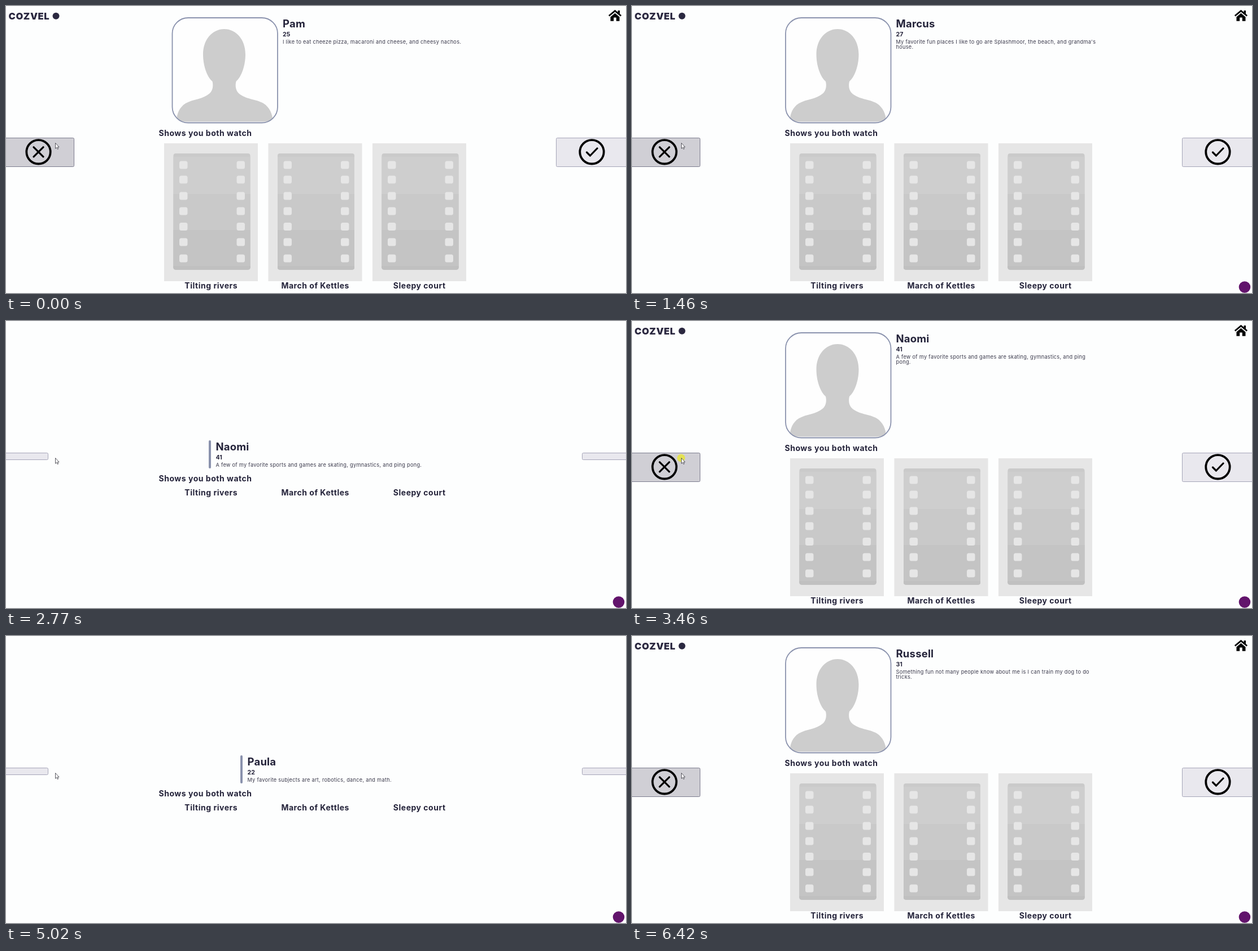
An HTML page for the animation above (7.11 s loop, 1098 by 510 pixels).

```html
<!DOCTYPE html>
<html lang="en">
<head>
<meta charset="utf-8">
<title>Profile matching</title>
<style>
  html, body { margin: 0; width: 100%; height: 100%; overflow: hidden; background: #fdfefe; }
  svg { display: block; }
  text { font-family: Inter, "Open Sans", sans-serif; fill: #24233a; }
  .name { font-size: 18.5px; font-weight: 700; letter-spacing: .2px; }
  .age { font-size: 10.6px; font-weight: 700; }
  .bio { font-size: 9.2px; letter-spacing: .28px; fill: #3b3a4c; }
  .head { font-size: 14px; font-weight: 700; letter-spacing: .52px; }
  .brand { font-size: 16.5px; font-weight: 900; letter-spacing: .6px; fill: #2b2840; }
  .mid { text-anchor: middle; }
  .button { fill: #e9e8ee; stroke: #a5a5b8; }
  .icon { fill: none; stroke: #000; stroke-width: 3.8; stroke-linecap: round; stroke-linejoin: round; }
</style>
</head>
<body>
<svg width="1098" height="510" viewBox="0 0 1098 510">
  <defs>
    <clipPath id="frameClip"><rect x="1" y="21" width="186" height="186" rx="27"/></clipPath>
    <clipPath id="filmClip"><rect x="16.500" y="262" width="136" height="206.500" rx="4"/></clipPath>
  </defs>

  <g id="loaded">
    <text class="brand" x="4.500" y="24">COZVEL</text>
    <circle cx="88.500" cy="17.800" r="6" fill="#2b2840"/>
    <path d="M1067.800 17.500L1078.500 8.600L1089.200 17.500" fill="none" stroke="#000" stroke-width="2.800"/>
    <path d="M1083.500 8h3.500v7h-3.500zM1070.500 19.500L1078.500 12.800L1086.500 19.500V26.700H1080.800V20.500H1076.200V26.700H1070.500Z"/>
    <g id="avatar">
      <rect x="1" y="21" width="186.500" height="186.500" rx="28" fill="#fefefe"/>
      <path clip-path="url(#frameClip)" fill="#cdcdcd" d="M93 41C114.500 41 130.500 60 130.500 86
        C130.500 106 123.500 126 114 134C112 142 113.500 150 118.500 155C130.500 166 148.500 165 162.500 173
        C173.500 180 178.500 192 179.500 205.500H8.500C8.500 192 13.500 180 24.500 173C38.500 165 55.500 166 67.500 155
        C72.500 150 74 142 72 134C62.500 126 55.500 106 55.500 86C55.500 60 71.500 41 93 41Z"/>
      <rect x="1" y="21" width="186.500" height="186.500" rx="28" fill="none" stroke="#8a92ad" stroke-width="1.800"/>
    </g>
    <g id="posters"></g>
    <rect id="reject" class="button" x="-4" y="234.500" width="124.500" height="51" rx="2"/>
    <rect class="button" x="974.500" y="234.500" width="130" height="51" rx="2"/>
    <g class="icon">
      <circle cx="57.500" cy="259.300" r="21.200"/>
      <path stroke-width="3.200" d="M49 250.800l17 17m0 -17l-17 17"/>
      <circle cx="1037.500" cy="259.300" r="21.200"/>
      <path stroke-width="3.200" d="M1028.500 260l6 6l12.500 -13"/>
    </g>
  </g>

  <g id="loading">
    <rect id="bar" y="212" width="4" height="50" rx="2" fill="#8a92ad"/>
    <rect class="button" x="-4" y="234.500" width="78.500" height="12" rx="2"/>
    <rect class="button" x="1020.500" y="234.500" width="90" height="12" rx="2"/>
  </g>

  <g id="profile">
    <text class="name" y="38"></text>
    <text class="age" y="53.500"></text>
    <text class="bio" y="67"></text>
    <text class="bio" y="76"></text>
  </g>
  <text id="heading" class="head" x="270.500">Shows you both watch</text>
  <g id="titles"></g>

  <circle id="badge" cx="1085" cy="499.500" r="10.300" fill="#62146c"/>
  <circle id="clickSpot" cx="87" cy="243.500" r="7" fill="#e6e43c" opacity=".85"/>
  <path d="M87.500 243.500V253.300L89.700 251.300L91.200 254.500L92.700 253.800L91.300 250.700H94Z"
    fill="#fff" stroke="#33333b" stroke-width=".8"/>
</svg>

<script>
const LOOP = 7110;
const byId = id => document.getElementById(id);
const show = (id, on) => byId(id).setAttribute("display", on ? "inline" : "none");

// left: avatar edge once loaded; bar: edge of the collapsed frame
const pam = { name: "Pam", age: 25, left: 293.5, bar: 380,
  bio: ["I like to eat cheeze pizza, macaroni and cheese, and cheesy nachos."] };
const marcus = { name: "Marcus", age: 27, left: 271, bar: 350,
  bio: ["My favorite fun places I like to go are Splashmoor, the beach, and grandma's", "house."] };
const naomi = { name: "Naomi", age: 41, left: 271, bar: 359,
  bio: ["A few of my favorite sports and games are skating, gymnastics, and ping", "pong."] };
const paula = { name: "Paula", age: 22, left: 323, bar: 415,
  bio: ["My favorite subjects are art, robotics, dance, and math."] };
const russell = { name: "Russell", age: 31, left: 271, bar: 350,
  bio: ["Something fun not many people know about me is I can train my dog to do", "tricks."] };

// [start, person, time spent loading]
const visits = [[0, pam, 0], [1380, marcus, 80], [2770, naomi, 90],
  [3930, marcus, 0], [5020, paula, 90], [6420, russell, 0]];
// [spot appears, button down, button up, spot disappears]
const clicks = [[910, 980, 1060, 1060], [2150, 2220, 2450, 2450], [3460, 3540, 3610, 3610],
  [4630, 4710, 4790, 4790], [5860, 5860, 6030, 6100]];

const bands = [[262, "#cacaca"], [268, "#cecece"], [334, "#c9c9c9"], [398, "#c4c4c4"], [462, "#c0c0c0"]];
const holes = [282.5, 308.5, 337.5, 364.5, 392, 419.5, 448.5];
const film = bands.map(([y, fill]) =>
    `<rect x="16" y="${y}" width="137" height="${469 - y}" fill="${fill}"/>`).join("") +
  holes.flatMap(y => [27, 128.5].map(x =>
    `<rect x="${x}" y="${y - 7}" width="14.500" height="14" rx="3.500" fill="#e6e6e6"/>`)).join("");

["Tilting rivers", "March of Kettles", "Sleepy court"].forEach((title, i) => {
  const x = 280 + i * 184.5;
  byId("posters").innerHTML += `<g transform="translate(${x})">
    <rect y="244" width="166" height="245" fill="#e6e6e6"/><g clip-path="url(#filmClip)">${film}</g></g>`;
  byId("titles").innerHTML += `<text class="head mid" x="${x + 83.2}">${title}</text>`;
});

function draw(t) {
  const [start, person, wait] = visits.findLast(v => t >= v[0]);
  const loading = t < start + wait;
  const lines = loading ? [person.bio.join(" ")] : person.bio;

  show("loaded", !loading);
  show("loading", loading);
  show("badge", t >= 1380);
  byId("avatar").setAttribute("transform", `translate(${person.left})`);
  byId("bar").setAttribute("x", person.bar);

  const words = [person.name, person.age, lines[0], lines[1] || ""];
  [...byId("profile").children].forEach((el, i) => { el.textContent = words[i]; });
  byId("profile").setAttribute("transform", loading
    ? `translate(${person.bar + 12.5} 192)` : `translate(${person.left + 196.5})`);
  byId("heading").setAttribute("y", loading ? 285 : 231);
  byId("titles").setAttribute("transform", `translate(0 ${loading ? 309.5 : 501.5})`);

  const click = clicks.find(c => t >= c[0] && t < c[3]);
  const pressed = click && t >= click[1] && t < click[2];
  show("clickSpot", click);
  byId("reject").style.fill = pressed ? "#b1b0b9" : "#d0cfd5";
  byId("reject").style.stroke = pressed ? "#5f5f6e" : "#7d7d8f";
}

const begin = performance.now();
function tick() {
  draw((performance.now() - begin) % LOOP);
  requestAnimationFrame(tick);
}
tick();
</script>
</body>
</html>
```
